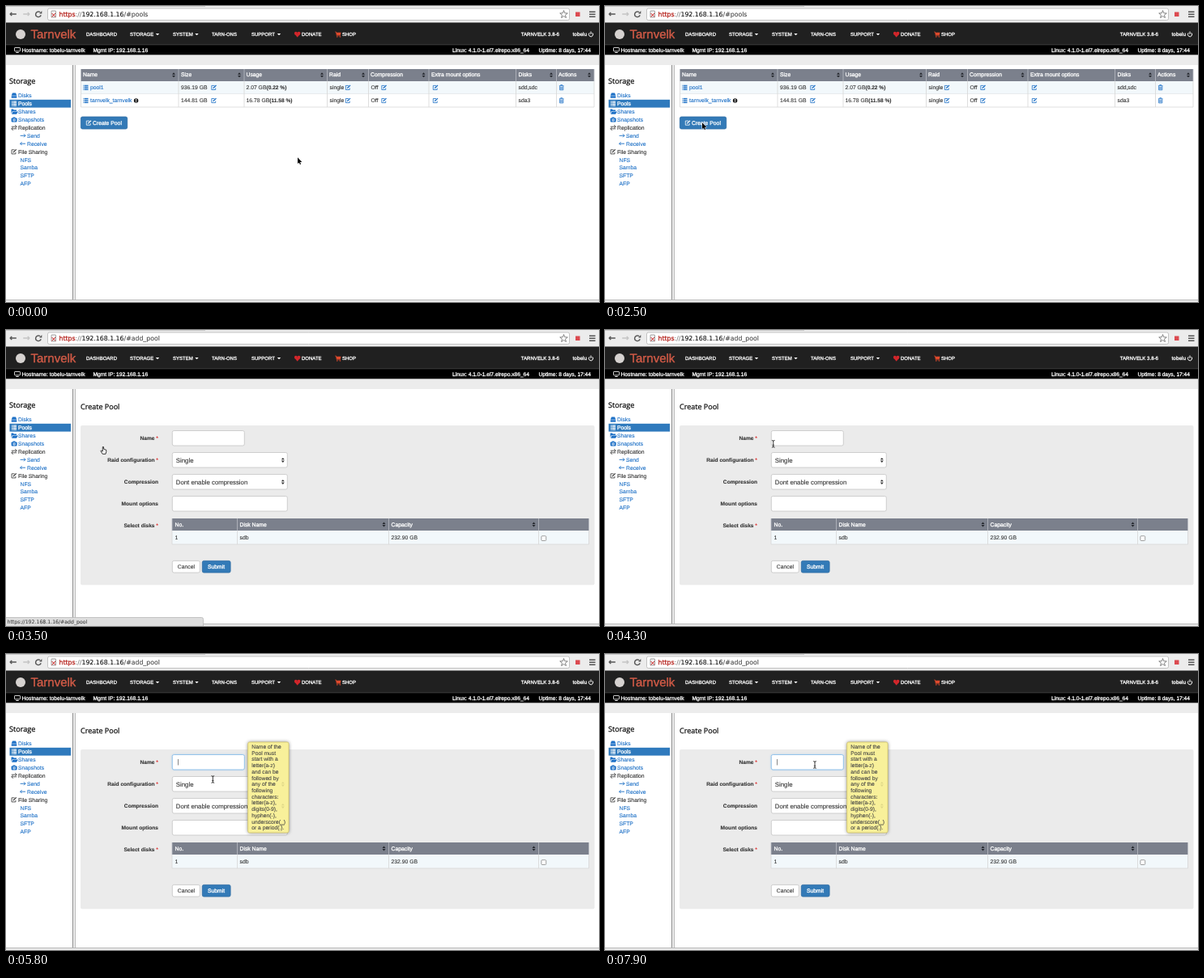
Animation, 732 px wide and 366 px high, one loop 8 s. Source, as an HTML page with a canvas:

```html
<!DOCTYPE html>
<html lang="en">
<head>
<meta charset="utf-8">
<title>Storage pools</title>
<style>
html, body { margin: 0; width: 100%; height: 100%; overflow: hidden; background: #fff; }
canvas { display: block; width: 732px; height: 366px; }
</style>
</head>
<body>
<canvas id="stage"></canvas>
<script>
const W = 732, H = 366, LOOP = 8000;
const canvas = document.getElementById('stage');
const c = canvas.getContext('2d');
const dpr = window.devicePixelRatio || 1;
canvas.width = W * dpr;
canvas.height = H * dpr;

const SANS = '"Liberation Sans", Arial, sans-serif';
const WIDE = '"DejaVu Sans", sans-serif';
const HEAD = '"Open Sans", sans-serif';
const LINK = '#1d70c6', BLUE = '#337ab7', GREY = '#7b808c', INK = '#333';

// Text is placed by its left (or right) edge and vertical centre.
function text(s, x, y, o = {}) {
  const { size = 6.8, color = INK, font = SANS, bold = false, align = 'left', heavy = 0.1 } = o;
  c.font = `${bold ? 'bold ' : ''}${size}px ${font}`;
  c.textAlign = align;
  c.fillStyle = color;
  c.fillText(s, x, y + size * 0.36);
  if (heavy) {
    c.strokeStyle = color;
    c.lineWidth = heavy;
    c.strokeText(s, x, y + size * 0.36);
  }
  return c.measureText(s).width;
}
const white = (s, x, y, size = 6.8, align = 'left') =>
  text(s, x, y, { size, align, color: '#fff', heavy: 0.3 });

function rect(x, y, w, h, color) {
  c.fillStyle = color;
  c.fillRect(x, y, w, h);
}
function box(x, y, w, h, r, fill, border) {
  c.beginPath();
  c.roundRect(x, y, w, h, r);
  if (fill) { c.fillStyle = fill; c.fill(); }
  if (border) { c.strokeStyle = border; c.lineWidth = 0.8; c.stroke(); }
}
function trace(pts, close) {
  c.beginPath();
  for (let i = 0; i < pts.length; i += 2) c.lineTo(pts[i], pts[i + 1]);
  if (close) c.closePath();
}
function line(color, width, ...pts) {
  trace(pts);
  c.strokeStyle = color;
  c.lineWidth = width;
  c.stroke();
}
function poly(color, ...pts) {
  trace(pts, true);
  c.fillStyle = color;
  c.fill();
}
function dot(x, y, r, color) {
  c.beginPath();
  c.arc(x, y, r, 0, 7);
  c.fillStyle = color;
  c.fill();
}
function at(x, y, draw) {
  c.save();
  c.translate(x, y);
  draw();
  c.restore();
}

const editIcon = (x, y, color = LINK) => at(x, y, () => {
  line(color, 0.8, 1, -2.4, -2.7, -2.4, -2.7, 2.7, 2.2, 2.7, 2.2, 0.6);
  line(color, 1.2, -0.9, 0.9, 3, -2.8);
});
const listIcon = (x, y, color) => {
  for (let i = -1.5; i < 2; i++) {
    rect(x - 3, y + i * 1.7 - 0.5, 1, 1.1, color);
    rect(x - 1.5, y + i * 1.7 - 0.5, 4.5, 1.1, color);
  }
};
const trashIcon = (x, y) => at(x, y, () => {
  rect(-2.8, -2.5, 5.6, 0.9, LINK);
  line(LINK, 0.8, -1, -2.6, -1, -3.2, 1, -3.2, 1, -2.6);
  line(LINK, 0.8, -2.1, -1.6, -2.1, 3, 2.1, 3, 2.1, -1.6);
  for (let i = -1; i < 2; i++) line(LINK, 0.6, i, -0.8, i, 2.2);
});
const sortIcon = (x, y, color = '#22252b') => {
  poly(color, x - 2, y - 0.6, x + 2, y - 0.6, x, y - 3);
  poly(color, x - 2, y + 0.6, x + 2, y + 0.6, x, y + 3);
};
const arrow = (x, y, dir, color, len = 3, width = 0.9) => {
  line(color, width, x - len, y, x + len, y);
  line(color, width, x + dir * (len - 2), y - 2, x + dir * len, y, x + dir * (len - 2), y + 2);
};

function toolbar(path) {
  rect(0, 0, W, 21, '#ececec');
  rect(0, 0, 246, 0.7, '#bbb');
  arrow(9, 10, -1, '#555', 3.8, 1.5);
  arrow(25, 10, 1, '#c4c4c4', 3.8, 1.5);
  c.beginPath();
  c.arc(40, 10.3, 3.3, 0.3, 5.4);
  c.strokeStyle = '#555';
  c.lineWidth = 1.4;
  c.stroke();
  poly('#555', 41, 9.6, 44.3, 9.6, 44.3, 6);
  box(51.5, 3, 644, 14.5, 2, '#fff', '#b5b5b5');
  box(56, 6, 5.5, 8, 0.5, '#f3f3f3', '#888');
  line('#c22', 1, 56.5, 9, 61, 13.5);
  line('#c22', 1, 61, 9, 56.5, 13.5);
  const o = { size: 7.8, font: WIDE };
  let x = 65.5;
  x += text('https', x, 10.2, { ...o, color: '#b5221c', heavy: 0.3 });
  x += text('://', x, 10.2, { ...o, color: '#777' });
  x += text('192.168.1.16', x, 10.2, { ...o, color: '#111' });
  text(path, x, 10.2, { ...o, color: '#444' });
  const star = [];
  for (let i = 0; i < 10; i++) {
    const r = i % 2 ? 2.1 : 5, a = i * Math.PI / 5 - Math.PI / 2;
    star.push(688.5 + r * Math.cos(a), 10.5 + r * Math.sin(a));
  }
  trace(star, true);
  c.strokeStyle = '#777';
  c.lineWidth = 0.9;
  c.stroke();
  rect(703, 7.5, 5.5, 5.5, '#dc4a50');
  for (let y = 6.5; y < 14; y += 3) rect(720, y, 7.5, 1.5, '#555');
}

function navbar() {
  rect(0, 20.5, W, 40, '#202020');
  rect(0, 48, W, 12.5, '#000');
  rect(0, 47.5, W, 0.8, '#444');
  dot(18, 35, 6, '#d6d2d0');
  text('Tarnvelk', 30.5, 34.7, { size: 15, color: '#d05a46', heavy: 0.4 });
  const items = [['DASHBOARD', 99], ['STORAGE', 153, 187], ['SYSTEM', 206, 235.5],
    ['TARN-ONS', 254], ['SUPPORT', 303, 337], ['DONATE', 365], ['SHOP', 415]];
  for (const [name, x, caret] of items) {
    white(name, x, 34.8, 6);
    if (caret) poly('#fff', caret - 2.2, 34, caret + 2.2, 34, caret, 36.3);
  }
  at(359.7, 35, () => {
    dot(-1.8, -1.2, 2, '#d3262b');
    dot(1.8, -1.2, 2, '#d3262b');
    poly('#d3262b', -3.6, -0.5, 3.6, -0.5, 0, 3.7);
  });
  at(410, 35, () => {
    poly('#e04a2c', -2.3, -2.2, 3.5, -2.2, 2.8, 0.9, -1.7, 0.9);
    line('#e04a2c', 0.8, -3.7, -3, -2.6, -3, -1.6, 1.8, 3, 1.8);
    dot(-1.2, 3, 0.8, '#e04a2c');
    dot(2.4, 3, 0.8, '#e04a2c');
  });
  white('TARNVELK 3.8-6', 683, 34.8, 6.1, 'right');
  white('tobelu', 717, 34.8, 6.4, 'right');
  c.beginPath();
  c.arc(722, 35.2, 2.6, -0.9, 4.05);
  c.strokeStyle = '#fff';
  c.lineWidth = 1;
  c.stroke();
  line('#fff', 1, 722, 31.5, 722, 35);

  box(10.5, 51.5, 7, 4.4, 0.6, null, '#fff');
  rect(12.3, 57, 3.4, 0.9, '#fff');
  white('Hostname: tobelu-tarnvelk', 19.5, 54.2, 6.7);
  white('Mgmt IP: 192.168.1.16', 107.5, 54.2, 6.7);
  white('Linux: 4.1.0-1.el7.elrepo.x86_64', 646, 54.2, 6.65, 'right');
  white('Uptime: 8 days, 17:44', 722, 54.2, 6.65, 'right');
}

function sidebar() {
  rect(0, 60.5, W, 306, '#ececec');
  rect(0, 73, 82, 290, '#fff');
  rect(82, 73, 1, 290, '#8d8d8d');
  rect(85.5, 73, W, 290, '#fff');
  rect(85, 73, 0.8, 290, '#aaa');
  rect(0, 363, W, 0.9, '#b0b0b0');
  text('Storage', 4, 92.8, { size: 9.1, font: HEAD, color: '#111', heavy: 0.25 });
  rect(4.5, 115.8, 75.5, 9.8, '#2f7abd');

  const items = [['Disks', 15], ['Pools', 15, '#fff'], ['Shares', 15], ['Snapshots', 15],
    ['Replication', 15, INK], ['Send', 26], ['Receive', 26], ['File Sharing', 15, INK],
    ['NFS', 17.5], ['Samba', 17.5], ['SFTP', 17.5], ['AFP', 17.5]];
  items.forEach(([name, x, color = LINK], i) => {
    const y = 110.7 + i * 9.92;
    if (color === '#fff') white(name, x, y);
    else text(name, x, y, { color });
  });
  poly(LINK, 8, 107.6, 12, 107.6, 13.3, 110.8, 6.7, 110.8);
  rect(6.7, 111.3, 6.6, 2.4, LINK);
  listIcon(10, 120.6, '#fff');
  poly(LINK, 6.5, 127.5, 9, 127.5, 9.7, 128.5, 13, 128.5, 13, 130, 8, 130, 6.5, 133);
  poly(LINK, 8.5, 130.6, 15, 130.6, 13, 133.8, 7, 133.8);
  box(6.6, 138.4, 7, 5, 0.8, LINK);
  rect(8.5, 137.5, 3, 1.5, LINK);
  dot(10.1, 140.9, 1.6, '#fff');
  dot(10.1, 140.9, 0.8, LINK);
  arrow(10, 149.2, 1, INK, 3.2, 0.8);
  arrow(10, 151.8, -1, INK, 3.2, 0.8);
  arrow(20.8, 160.3, 1, LINK, 3.2);
  arrow(20.8, 170.2, -1, LINK, 3.2);
  editIcon(9.7, 180.2, INK);
}

function grid(cols, top, rows, right) {
  const left = cols[0], bottom = rows[rows.length - 1];
  rect(left, top, right - left, rows[0] - top, GREY);
  for (let i = 0; i + 1 < rows.length; i++) {
    rect(left, rows[i], right - left, rows[i + 1] - rows[i], i % 2 ? '#fff' : '#f2f8fb');
    rect(left, rows[i + 1] - 0.4, right - left, 0.8, '#d6d6d6');
  }
  for (const x of [...cols, right]) {
    rect(x - 0.4, rows[0], 0.8, bottom - rows[0], '#d6d6d6');
    rect(x - 0.4, top, 0.8, rows[0] - top, '#b9bcc4');
  }
}

function poolsPage(pressed) {
  grid([92.5, 213, 294, 396.5, 447.5, 522, 629.5, 679.5], 78, [93, 109, 125], 726);
  const heads = [['Name', 95], ['Size', 216], ['Usage', 296.5], ['Raid', 399], ['Compression', 450],
    ['Extra mount options', 525], ['Disks', 632.5], ['Actions', 682]];
  for (const [s, x] of heads) white(s, x, 85);
  for (const x of [207, 288, 390, 441, 515.5, 673, 720]) sortIcon(x, 85.3);

  const rows = [['pool1', '936.19 GB', '2.07 GB', '(0.22 %)', 'sdd,sdc'],
    ['tarnvelk_tarnvelk', '144.81 GB', '16.78 GB', '(11.58 %)', 'sda3']];
  rows.forEach(([name, size, used, share, disks], i) => {
    const y = 100.8 + i * 16.1;
    listIcon(98.5, y, LINK);
    text(name, 104, y, { color: LINK });
    text(size, 216, y);
    const w = text(used, 296.5, y);
    text(share, 296.5 + w, y, { bold: true, size: 6.6 });
    text('single', 399.5, y);
    text('Off', 450.5, y);
    text(disks, 632.5, y);
    for (const x of [256.5, 422, 466.5, 530]) editIcon(x, y);
    trashIcon(685.7, y);
  });
  dot(160.6, 117, 2.8, '#222');
  rect(160.1, 115.2, 1, 2.2, '#fff');
  rect(160.1, 118, 1, 0.9, '#fff');

  box(92.4, 137, 57.3, 15, 2, pressed ? '#82c3f1' : BLUE, pressed ? '#3d7fae' : '#2e6da4');
  editIcon(102, 144.5, '#fff');
  white('Create Pool', 107, 144.5);
}

function formPage(focused, caret) {
  text('Create Pool', 92, 94.3, { size: 9, font: HEAD, color: '#111', heavy: 0.25 });
  box(92, 118, 634.5, 197.3, 2, '#ebebeb');
  const labels = [['Name', 133.3, 1], ['Raid configuration', 160.3, 1], ['Compression', 187.3],
    ['Mount options', 214.3], ['Select disks', 241.3, 1]];
  for (const [s, y, required] of labels) {
    text(s, required ? 183.5 : 188, y, { bold: true, size: 6.6, align: 'right' });
    if (required) text('*', 185.2, y + 0.3, { color: '#d22' });
  }
  if (focused) {
    c.save();
    c.shadowColor = 'rgba(102,175,233,.6)';
    c.shadowBlur = 2.5 * dpr;
    box(205.3, 124.5, 89, 18.5, 2, '#fff');
    c.restore();
  }
  box(205.3, 124.5, 89, 18.5, 2, '#fff', focused ? '#7db6e8' : '#c4c4c4');
  if (caret && focused) rect(212, 130, 0.7, 7.5, '#555');
  [['Single', 151.5], ['Dont enable compression', 178.5], ['', 205.5]].forEach(([s, y]) => {
    box(205.3, y, 142, 18.5, 2, '#fff', '#c4c4c4');
    if (!s) return;
    text(s, 209.8, y + 9.4, { size: 7.8 });
    sortIcon(341.8, y + 9.4, '#333');
  });

  grid([205, 285.5, 472.5, 657.5], 233, [248, 265], 719.5);
  white('No.', 208.5, 240.3);
  white('Disk Name', 288.5, 240.3);
  white('Capacity', 475.5, 240.3);
  sortIcon(466.5, 240.5);
  sortIcon(651.5, 240.5);
  text('1', 208.5, 256.3);
  text('sdb', 288.5, 256.3);
  text('232.90 GB', 475.5, 256.3);
  box(660.9, 254.7, 5.8, 5.8, 1, '#fff', '#888');

  box(205.3, 285.4, 34, 14.6, 2, '#fff', '#c4c4c4');
  text('Cancel', 211.8, 292.7);
  box(242.3, 285.4, 34.8, 14.6, 2, BLUE, '#2e6da4');
  white('Submit', 249, 292.7);
}

const HINT = ['Name of the', 'Pool must', 'start with a', 'letter(a-z)', 'and can be', 'followed by',
  'any of the', 'following', 'characters:', 'letter(a-z),', 'digits(0-9),', 'hyphen(-),',
  'underscore(_)', 'or a period(.).'];
function hint() {
  c.save();
  c.shadowColor = 'rgba(0,0,0,.55)';
  c.shadowBlur = 4 * dpr;
  box(298.7, 109, 50.3, 112, 2, '#f8f09a');
  c.restore();
  box(298.7, 109, 50.3, 112, 2, null, '#d3c66b');
  // The select arrows show faintly through the note.
  for (const y of [160.9, 187.9]) sortIcon(341.8, y, 'rgba(80,80,40,.15)');
  HINT.forEach((s, i) => text(s, 303.3, 114.4 + i * 7.74, { size: 6.7, color: '#444' }));
}

function statusBubble() {
  box(-3, 355.5, 246.5, 13, 2, '#dedede', '#b8b8b8');
  text('https://192.168.1.16/#add_pool', 1.5, 360.7, { size: 6.2, font: WIDE, color: '#444' });
}

const pointers = {
  arrow() {
    trace([0, 0, 0, 7.6, 1.7, 6.1, 2.9, 8.8, 4.1, 8.3, 2.9, 5.7, 5.3, 5.6], true);
    c.strokeStyle = '#fff';
    c.lineWidth = 1;
    c.stroke();
    c.fillStyle = '#000';
    c.fill();
  },
  hand() {
    trace([-0.7, 0.2, 0.5, 0.2, 0.7, 3, 3.6, 3.9, 3.8, 6, 3, 9, -0.8, 9, -3, 5.4, -2.4, 4.6, -0.7, 5.8], true);
    c.fillStyle = '#fff';
    c.fill();
    c.strokeStyle = '#222';
    c.lineWidth = 0.9;
    c.stroke();
  },
  beam() {
    line('#222', 0.9, 0, -3.8, 0, 4);
    line('#222', 0.9, -1.8, -4.2, 0, -3.6, 1.8, -4.2);
    line('#222', 0.9, -1.8, 4.5, 0, 3.9, 1.8, 4.5);
    line('#222', 0.7, -1.2, 1.6, 1.2, 1.6);
  }
};

// Pointer stops: time, x, y
const STOPS = [[0, 360, 187.3], [1200, 360, 187.3], [2300, 120, 144.3], [3700, 120, 144.3],
  [4500, 224, 140], [5500, 224, 140], [6300, 323, 187], [7500, 323, 187], [7900, 259, 136.8]];
function pointerAt(t) {
  const i = STOPS.findIndex(s => s[0] > t);
  if (i < 0) return STOPS[STOPS.length - 1].slice(1);
  const [t0, x0, y0] = STOPS[i - 1], [t1, x1, y1] = STOPS[i];
  const u = (t - t0) / (t1 - t0), e = u * u * (3 - 2 * u);
  return [x0 + (x1 - x0) * e, y0 + (y1 - y0) * e];
}

function draw(t) {
  const onForm = t >= 3500, focused = t >= 4800, clicked = t >= 3200;
  c.setTransform(dpr, 0, 0, dpr, 0, 0);
  c.lineJoin = 'round';
  c.textRendering = 'geometricPrecision';
  rect(0, 0, W, H, '#fff');
  toolbar(clicked ? '/#add_pool' : '/#pools');
  navbar();
  sidebar();
  if (onForm) formPage(focused, (t + 200) % 1000 < 500);
  else poolsPage(clicked);
  if (focused) hint();
  if (t >= 2600 && t < 3800) statusBubble();

  const [x, y] = pointerAt(t);
  let kind = 'arrow';
  if (t >= 2600 && t < 3700) kind = 'hand';
  else if (t >= 3700 && x > 205) kind = 'beam';
  at(x, y, pointers[kind]);
}

function tick() {
  draw(Math.floor(performance.now() % LOOP / 100) * 100);
  requestAnimationFrame(tick);
}
tick();
</script>
</body>
</html>
```
